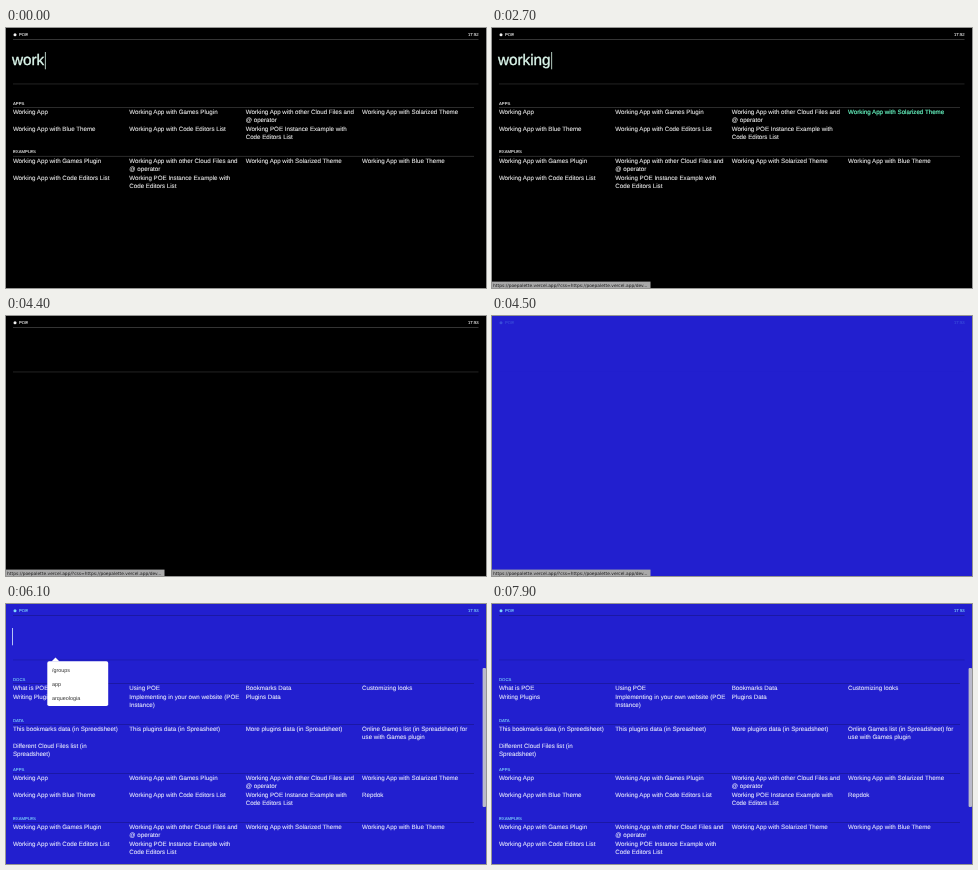
An HTML page that plays this animation: 480 by 260 pixels, repeating every 8000 ms.

```html
<!DOCTYPE html>
<html lang="en">
<head>
<meta charset="utf-8">
<title>Command palette</title>
<style>
  html, body { margin: 0; width: 100%; height: 100%; overflow: hidden; background: #000; }
  svg { display: block; width: 480px; height: 260px; text-rendering: geometricPrecision;
        font-family: "Liberation Sans", Arial, sans-serif;
        --bg: #000; --text: #e6e6e6; --head: #f2f2f2; --rule: #363636;
        --line: #3a3a3a; --line2: #262626; --input: #dcf7ec; }
  svg.blue { --bg: #221fcf; --text: #e2e4fb; --head: #7fd6fb; --rule: #19179c;
             --line: #1b199f; --line2: #1d1bb0; --input: #dcecff; }
  #bg { fill: var(--bg); }
  .item { font-size: 6.19px; fill: var(--text); stroke: var(--text); stroke-width: .1px; }
  .item.on { fill: #62ecba; stroke: #62ecba; stroke-width: .2px; }
  .head, .top { font-size: 4.26px; fill: var(--head); stroke: var(--head); stroke-width: .08px; }
  .rule { fill: var(--rule); }
  #query { font-size: 15.3px; fill: var(--input); stroke: var(--input); stroke-width: .35px; }
  #caret { fill: var(--input); }
  #status text { font: 4.37px "DejaVu Sans", sans-serif; fill: #1c1c1c; }
  #popup text { font-size: 5.4px; fill: #333; }
</style>
</head>
<body>
<svg id="stage" viewBox="0 0 480 260">
  <rect id="bg" width="480" height="260"/>
  <g id="brand">
    <circle cx="9" cy="6.7" r="1.5" fill="var(--head)"/>
    <text class="top" x="13" y="8.4">POE</text>
    <text class="top" x="462" y="8.4">17</text>
    <text class="top" x="466.7" y="8.4" id="colon">:</text>
    <text class="top" x="467.9" y="8.4" id="minutes">52</text>
  </g>
  <g id="lines">
    <rect x="7" y="11" width="465.5" height=".9" fill="var(--line)"/>
    <rect x="7" y="55.5" width="465.5" height=".9" fill="var(--line2)"/>
  </g>
  <text id="query" x="5.9" y="37.3"></text>
  <rect id="caret" y="24" width=".8" height="17.3"/>
  <g id="results"></g>
  <g id="home"></g>
  <rect id="thumb" x="476.6" y="64" width="3.4" height="139" rx="1" fill="#babacb"/>
  <g id="popup">
    <path d="M45.5 57.5 49.5 53.4 53.5 57.5Z" fill="#fff"/>
    <rect x="41.3" y="57.2" width="60.9" height="44.8" rx="1.8" fill="#fff"/>
    <text x="46" y="67.7">/groups</text>
    <text x="46" y="81.6">app</text>
    <text x="46" y="95.5">arqueologia</text>
  </g>
  <g id="status">
    <rect y="253.6" width="158.5" height="6.4" fill="#a9a9a9"/>
    <text x="1" y="258.9"></text>
  </g>
</svg>
<script>
const $ = id => document.getElementById(id);
const LOOP = 8000, RELOAD = 4400, BLUE = 4500;

const games = "Working App with Games Plugin";
const cloud = "Working App with other Cloud Files and\n@ operator";
const solar = "Working App with Solarized Theme";
const blue = "Working App with Blue Theme";
const code = "Working App with Code Editors List";
const poe = "Working POE Instance Example with\nCode Editors List";

const apps = ["Working App", games, cloud, solar, blue, code, poe];
const examples = [games, cloud, solar, blue, code, poe];
const docs = ["What is POE", "Using POE", "Bookmarks Data", "Customizing looks",
  "Writing Plugins", "Implementing in your own website (POE\nInstance)", "Plugins Data"];
const data = ["This bookmarks data (in Spreedsheet)", "This plugins data (in Spreasheet)",
  "More plugins data (in Spreadsheet)", "Online Games list (in Spreadsheet) for\nuse with Games plugin",
  "Different Cloud Files list (in\nSpreadsheet)"];

function add(parent, tag, attrs, text = "") {
  const el = document.createElementNS("http://www.w3.org/2000/svg", tag);
  for (const k in attrs) el.setAttribute(k, attrs[k]);
  el.textContent = text;
  return parent.appendChild(el);
}

// Lays out titled sections in four columns and returns the item groups.
function build(parent, sections) {
  const items = [];
  let y = 76.5;
  for (const [title, list] of sections) {
    add(parent, "text", { class: "head", x: 7, y }, title);
    add(parent, "rect", { class: "rule", x: 7, y: y + 2.5, width: 461, height: .8 });
    y += 9.7;
    for (let i = 0; i < list.length; i += 4) {
      let tall = 1;
      list.slice(i, i + 4).forEach((label, col) => {
        const g = add(parent, "g", { class: "item" });
        const rows = label.split("\n");
        rows.forEach((row, n) => add(g, "text", { x: 6.9 + col * 116.4, y: y + n * 7.7 }, row));
        tall = Math.max(tall, rows.length);
        items.push(g);
      });
      y += tall * 7.7 + 1.3;
    }
    y += 5.8;
  }
  return items;
}

const links = build($("results"), [["APPS", apps], ["EXAMPLES", examples]]);
build($("home"), [["DOCS", docs], ["DATA", data], ["APPS", [...apps, "Repdok"]], ["EXAMPLES", examples]]);

const site = "https://poepalette.vercel.app/";
const css = site + "?css=" + site + "dev...";
const urls = [css, site + "?plugins=" + site + "ga...", site + "?json=" + site + "dev...",
  css, css, site + "?title=CODE TOOLS&json=https://open..."];

// [start time, selected link]
const picks = [[0, -1], [1300, 0], [2100, 1], [2400, 2], [2700, 3], [2900, 4], [3200, 5], [3500, 4]];

const clamp = v => Math.max(0, Math.min(1, v));
const show = (id, v) => $(id).setAttribute("opacity", +v);
const within = (t, a, b) => t >= a && t < b;

function draw(t) {
  const reloaded = t >= RELOAD, isBlue = t >= BLUE;
  $("stage").setAttribute("class", isBlue ? "blue" : "");

  // header
  show("brand", isBlue ? clamp(.25 + (t - BLUE) / 350) : 1);
  show("lines", isBlue ? clamp((t - BLUE) / 300) : 1);
  const peak = reloaded ? 350 : 800;
  show("colon", .5 + .5 * Math.cos((t - peak) / 1000 * 2 * Math.PI));
  $("minutes").textContent = reloaded ? "53" : "52";

  // typed query and caret
  const typed = Math.min(7, 4 + Math.floor(t / 100));
  $("query").textContent = reloaded ? "" : "working".slice(0, typed);
  const x = reloaded ? 6.1 : [38.9, 42.3, 50.8, 59.3][typed - 4];
  $("caret").setAttribute("x", x);
  const blink = reloaded
    ? t >= 5100 && Math.floor((t - 5100) / 500) % 2 === 0
    : t < 800 || Math.floor((t - 800) / 500) % 2 === 1;
  show("caret", blink);

  // lists
  const pick = picks.filter(p => t >= p[0]).pop()[1];
  links.forEach((g, i) => g.classList.toggle("on", i === pick));
  show("results", !reloaded);
  const home = t < 5000 ? 0 : clamp((t - 4920) / 250);
  show("home", home);
  show("thumb", home);
  show("popup", within(t, 5700, 7500));

  // link preview
  show("status", within(t, 1500, 4700));
  $("status").lastElementChild.textContent = urls[Math.max(0, pick)];
}

const start = performance.now();
function tick() {
  draw((performance.now() - start) % LOOP);
  requestAnimationFrame(tick);
}
tick();
</script>
</body>
</html>
```
